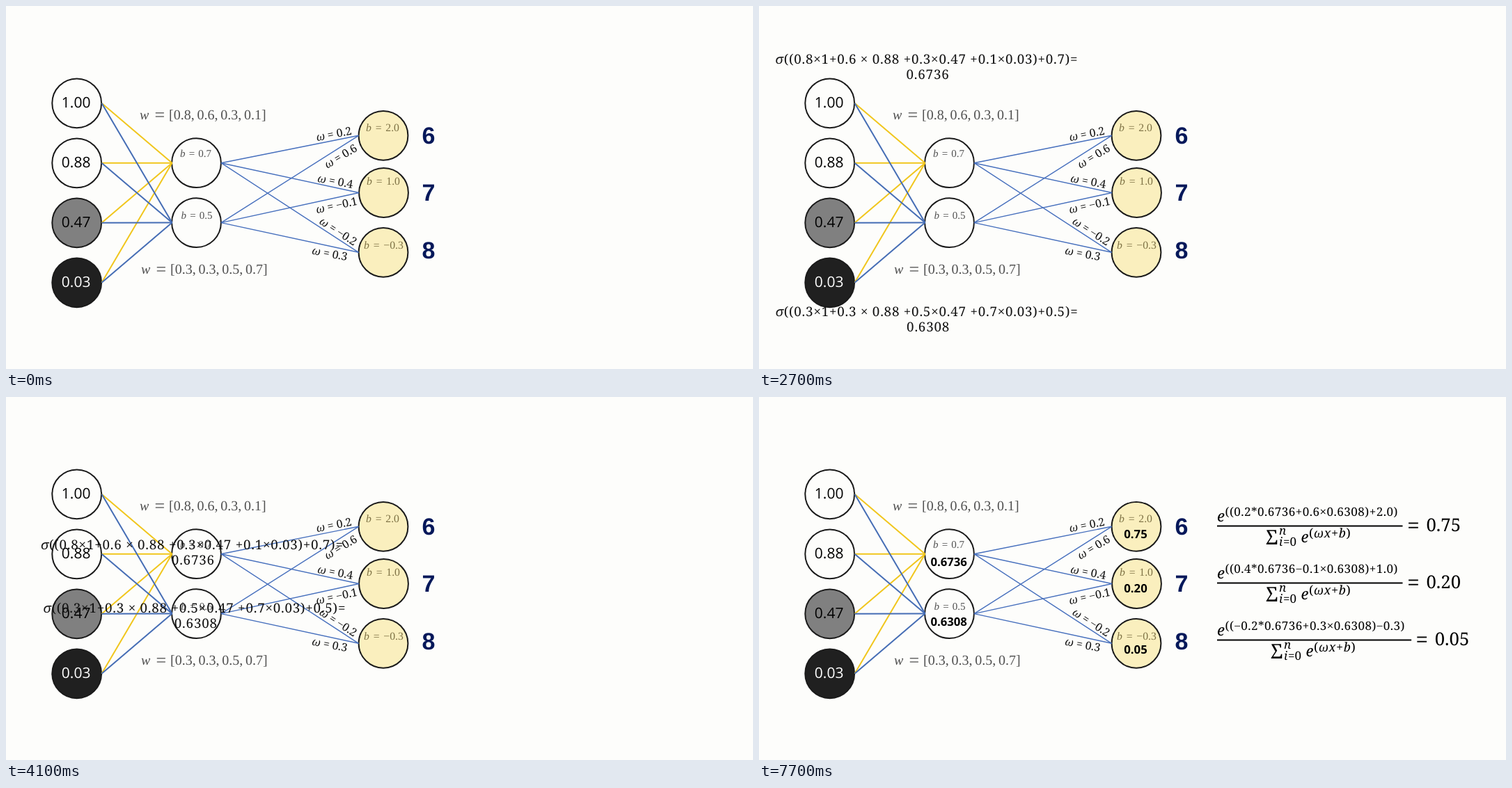
An HTML page for the animation above (7.8 s loop, 1073 px wide and 522 px high).

```html
<!DOCTYPE html>
<html lang="en">
<head>
<meta charset="utf-8">
<title>Neural network forward pass</title>
<style>
  html, body { margin: 0; width: 100%; height: 100%; overflow: hidden; background: #fdfdfb; }
  svg { display: block; width: 100%; height: 100%; }
  text { white-space: pre; text-rendering: geometricPrecision; }
  .input { font: 21px "Open Sans", sans-serif; text-anchor: middle; }
  .value { font: bold 16.7px "Open Sans", sans-serif; text-anchor: middle; }
  .label { font: bold 34px "Liberation Sans", sans-serif; text-anchor: middle; fill: #04185a; }
  .tex { font-family: "Liberation Serif", serif; fill: #505050; }
  .math { font-family: "Noto Serif", serif; }
  .equation { font: 18.8px "Noto Serif", serif; letter-spacing: .78px; fill: #111; }
  .omega { font: 16px "Noto Serif", serif; text-anchor: middle; fill: #111; }
  .it { font-style: italic; }
</style>
</head>
<body>
<svg id="stage" viewBox="0 0 1073 522"></svg>
<script>
const stage = document.getElementById('stage');
const LOOP = 7800, STEP = 100;
const INK = '#1a1a1a', YELLOW = '#f1c61c', BLUE = '#456db5';

function add(parent, tag, attrs = {}, text) {
  const node = document.createElementNS('http://www.w3.org/2000/svg', tag);
  for (const key in attrs) node.setAttribute(key, attrs[key]);
  if (text !== undefined) node.textContent = text;
  parent.appendChild(node);
  return node;
}
const group = (opacity = 1) => add(stage, 'g', { opacity });
const write = (parent, cls, x, y, text, more) => add(parent, 'text', { class: cls, x, y, ...more }, text);
const line = (parent, x1, y1, x2, y2, stroke, width) =>
  add(parent, 'line', { x1, y1, x2, y2, stroke, 'stroke-width': width });
const node = (cx, cy, fill) =>
  add(stage, 'circle', { cx, cy, r: 35.4, fill, stroke: INK, 'stroke-width': 2 });

// Italic variable followed by upright text.
function formula(parent, cls, x, y, variable, rest, more) {
  const text = write(parent, cls, x, y, undefined, more);
  add(text, 'tspan', { class: 'it' }, variable);
  add(text, 'tspan', {}, rest);
}

const inputs = [
  [139.8, '1.00', 'none', '#000'], [225.8, '0.88', 'none', '#000'],
  [311.8, '0.47', '#808080', '#000'], [397.8, '0.03', '#202020', '#fff']
];
const hidden = [
  [225.7, 250, 217, '0.7', '0.6736'], [311.6, 251.5, 305.5, '0.5', '0.6308']
];
const outputs = [
  [542, 186.3, 517, 179.5, '2.0', '0.75', 203],
  [542.5, 268.5, 518, 257.3, '1.0', '0.20', 281],
  [542, 354.3, 514, 348.5, '−0.3', '0.05', 368.7]
];

for (const [cy, , fill] of inputs) node(101.7, cy, fill);
for (const [cy] of hidden) node(273.5, cy, 'none');
for (const [cx, cy] of outputs) node(cx, cy, '#faefbe');

hidden.forEach(([hy], i) => {
  for (const [y] of inputs) line(stage, 137.5, y, 238.5, hy, i ? BLUE : YELLOW, 2);
  for (const [cx, y] of outputs) line(stage, 309, hy, cx - 35.5, y, '#466fbd', 1.4);
});

for (const [cy, text, , fill] of inputs) write(stage, 'input', 100.6, cy + 6.4, text, { fill });
for (const [, x, y, bias] of hidden)
  formula(stage, 'tex', x, y, 'b', ' = ' + bias, { 'font-size': 15, 'word-spacing': 1.4 });
outputs.forEach(([, , x, y, bias], i) => {
  formula(stage, 'tex', x, y, 'b', ' = ' + bias,
    { 'font-size': 15.7, 'word-spacing': 1.9, style: 'fill:#7d7144' });
  write(stage, 'label', 607, 197.7 + 82.6 * i, 6 + i);
});

for (const [x, y, list] of [[192, 163, '[0.8, 0.6, 0.3, 0.1]'], [194, 384.7, '[0.3, 0.3, 0.5, 0.7]']]) {
  write(stage, 'tex it', x, y, 'w', { 'font-size': 20 });
  write(stage, 'tex', x + 21.5, y + 2, '=', { 'font-size': 26 });
  write(stage, 'tex', x + 42, y, list, { 'font-size': 20, 'word-spacing': -1.2 });
}

for (const [x, y, angle, weight] of [
  [471, 184.5, -11, '0.2'], [481, 216.5, -31, '0.6'], [473, 252.5, 10.5, '0.4'],
  [475, 287, -12, '−0.1'], [477, 324.5, 33, '−0.2'], [465, 356.5, 11, '0.3']
]) formula(stage, 'omega', 0, 5, 'ω', ' = ' + weight, { transform: `translate(${x} ${y}) rotate(${angle})` });

const activationValues = group(0);
for (const [cy, , , , value] of hidden) write(activationValues, 'value', 272.7, cy + 17.3, value);

const outputValues = group(0);
for (const [, , , , , value, y] of outputs) write(outputValues, 'value', 541, y, value);

// Softmax fractions
const fractions = group(0);
function fraction(y, exponent, result, shift) {
  const g = add(fractions, 'g', { transform: `translate(0 ${y})` });
  const put = (x, dy, text, size, cls = '', spacing = 0) =>
    write(g, 'math ' + cls, x, dy, text, { 'font-size': size, 'letter-spacing': spacing });
  put(658, -7, 'e', 22, 'it');
  put(669.5, -15, exponent, 17, '', .5);
  line(g, 658, 0, 924.5 + shift * 1.8, 0, '#000', 2);
  put(728 + shift, 26.5, 'Σ', 29);
  put(747 + shift, 12, 'n', 17, 'it');
  put(747 + shift, 28, 'i', 17, 'it');
  put(753 + shift, 28, '=0', 17);
  put(778.5 + shift, 23, 'e', 22, 'it');
  const power = put(790 + shift, 16.5, undefined, 18, '', .7);
  for (const [text, cls] of [['(', ''], ['ωx', 'it'], ['+', ''], ['b', 'it'], [')', '']])
    add(power, 'tspan', { class: cls }, text);
  put(931 + shift * 1.75, 10.8, '=', 32);
  put(958.5 + shift * 1.75, 7.5, result, 25.7);
}
fraction(185.5, '((0.2*0.6736+0.6×0.6308)+2.0)', '0.75', 0);
fraction(267.5, '((0.4*0.6736−0.1×0.6308)+1.0)', '0.20', 0);
fraction(349.5, '((−0.2*0.6736+0.3×0.6308)−0.3)', '0.05', 7);

// Activation equations that travel into the hidden nodes
function equation(x, y, sum, result, dx, dy) {
  const g = group(0);
  formula(g, 'equation', x, y, 'σ', sum);
  write(g, 'equation', 238.4, y + 22, result, { 'text-anchor': 'middle' });
  return { g, dx, dy };
}
const equations = [
  equation(19.5, 61.7, '((0.8×1+0.6 × 0.88 +0.3×0.47 +0.1×0.03)+0.7)=', '0.6736', 30.5, 158),
  equation(19, 467.2, '((0.3×1+0.3 × 0.88 +0.5×0.47 +0.7×0.03)+0.5)=', '0.6308', 34.5, -158)
];

const progress = (t, start, length) => Math.min(1, Math.max(0, (t - start) / length));
const fade = (t, start) => progress(t, start, 500);
const ease = p => p < .5 ? 2 * p * p : 1 - 2 * (1 - p) ** 2;

function draw(t) {
  const move = ease(progress(t, 2180, 2000));
  for (const { g, dx, dy } of equations) {
    g.setAttribute('opacity', fade(t, 1680) - fade(t, 4180));
    g.setAttribute('transform', `translate(${dx * move} ${dy * move})`);
  }
  activationValues.setAttribute('opacity', fade(t, 4680));
  fractions.setAttribute('opacity', fade(t, 5180));
  outputValues.setAttribute('opacity', fade(t, 6180));
}

const began = performance.now();
function tick() {
  const t = (performance.now() - began) % LOOP;
  draw(Math.floor(t / STEP) * STEP);
  requestAnimationFrame(tick);
}
tick();
</script>
</body>
</html>
```
